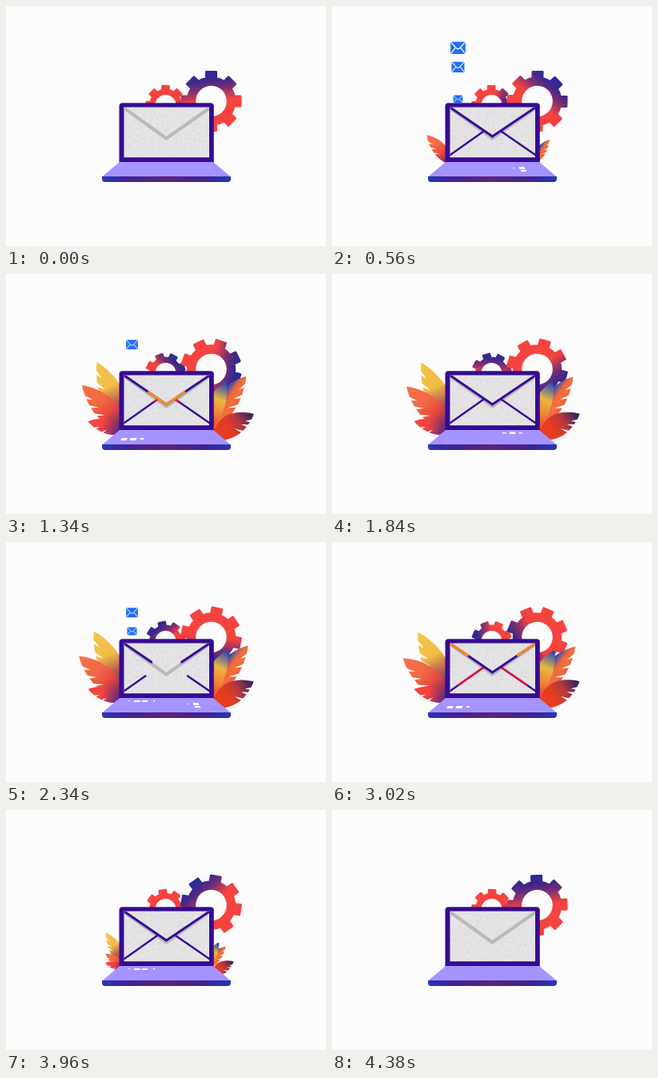
Recreate the animation shown at these times as an HTML page with a canvas. Size 400 by 300 pixels, loop 4400 ms.

```html
<!DOCTYPE html>
<html lang="en">
<head>
<meta charset="utf-8">
<title>Mail laptop</title>
<style>
html, body { margin: 0; width: 100%; height: 100%; overflow: hidden; background: #fcfcfc; }
canvas { display: block; width: 400px; height: 300px; }
</style>
</head>
<body>
<canvas id="stage"></canvas>
<script>
const LOOP = 4400, HALF = 2200, TAU = Math.PI * 2;
const canvas = document.getElementById('stage');
const ctx = canvas.getContext('2d');
const dpr = window.devicePixelRatio || 1;
canvas.width = 400 * dpr;
canvas.height = 300 * dpr;

const clamp = v => Math.max(0, Math.min(1, v));
const ramp = (t, a, b) => clamp((t - a) / (b - a));
const smooth = p => p * p * (3 - 2 * p);
const rad = deg => deg * Math.PI / 180;

function gradient(x0, y0, x1, y1, stops) {
  const g = ctx.createLinearGradient(x0, y0, x1, y1);
  stops.forEach(([at, color]) => g.addColorStop(at, color));
  return g;
}

function poly(points, close = true) {
  ctx.beginPath();
  points.forEach(([x, y], i) => i ? ctx.lineTo(x, y) : ctx.moveTo(x, y));
  if (close) ctx.closePath();
}

function roundBox(x, y, w, h, radii, fill) {
  ctx.beginPath();
  ctx.roundRect(x, y, w, h, radii);
  ctx.fillStyle = fill;
  ctx.fill();
}

// Gears
function gear(x, y, r, hole, turn, darkAt) {
  const edge = 1.4, tip = r - edge, root = r * 0.8 - edge;
  const points = [];
  for (let i = 0; i < 8; i++) {
    const mid = i * 45 - 90;
    for (const [d, q] of [[-22.5, root], [-12, root], [-9.5, tip], [9.5, tip], [12, root]]) {
      const a = rad(mid + d);
      points.push([Math.cos(a) * q, Math.sin(a) * q]);
    }
  }
  const dx = Math.cos(rad(darkAt)) * r, dy = Math.sin(rad(darkAt)) * r;
  const paint = gradient(dx, dy, -dx, -dy, [
    [0, '#2a2a9a'], [0.16, '#3f2889'], [0.32, '#86306f'], [0.5, '#f5433f'], [1, '#f5433f']
  ]);
  ctx.save();
  ctx.translate(x, y);
  ctx.rotate(rad(turn));
  ctx.fillStyle = ctx.strokeStyle = paint;
  ctx.lineJoin = 'round';
  ctx.lineWidth = edge * 2;
  poly(points);
  ctx.stroke();
  ctx.moveTo(hole, 0);
  ctx.arc(0, 0, hole, 0, TAU);
  ctx.fill('evenodd');
  ctx.restore();
}

// Leaves: base, angle, turn per second, length, half width, delay, cuts on the outer edge,
// colours from base to tip (or from inner to outer edge)
const LEAVES = [
  { x: 150, y: 200, a: -112, spin: -2.4, len: 97, w: 17, wait: 150, cuts: [12, 14, 17], c: ['#4a2a80', '#b85a52', '#f0bd48', '#f4c348'] },
  { x: 150, y: 200, a: -132, spin: -3.7, len: 82, w: 16, wait: 0, cuts: [10, 13, 16], c: ['#6a2a70', '#ea4a3e', '#f26a45', '#f27045'] },
  { x: 150, y: 200, a: -161.5, spin: 0.2, len: 50, w: 10, wait: 150, cuts: [11, 15], c: ['#452a8a', '#b0365e', '#f5443f', '#f5443f'] },
  { x: 250, y: 200, a: -55.2, spin: 1.9, len: 88, w: 16, wait: 40, across: true, cuts: [11, 14, 17], c: ['#2f4bb8', '#ee6a3a', '#f2703c', '#ee5538'] },
  { x: 250, y: 200, a: -69, spin: 1.5, len: 71, w: 13, wait: 140, cuts: [], c: ['#e0452f', '#f08a35', '#e9b640', '#2f4bb0'] },
  { x: 255, y: 208, a: -31, spin: -0.5, len: 64, w: 16, wait: 150, cuts: [12, 15, 17], c: ['#ea3c1c', '#e63c22', '#b8383e', '#37255f'] }
];

function growth(t, wait) {
  const s = t - wait, back = t - wait * 0.4;
  if (t > 3000) return 1 - smooth(ramp(back, 3620, 4220));
  return 1.05 * smooth(ramp(s, 340, 740)) - 0.05 * smooth(ramp(s, 740, 960));
}

function leaf(l, t) {
  const size = growth(t, l.wait);
  if (size < 0.01) return;
  const out = l.x < 200 ? -1 : 1;
  const side = (sign, width, cuts) => {
    const points = [];
    for (let k = 0; k <= 20; k++) {
      const u = k / 20, h = sign * width * Math.pow(Math.max(0, Math.sin(Math.PI * u)), 0.85);
      points.push([u * l.len, h]);
      if (cuts.includes(k)) points.push([(u - 0.07) * l.len, h * 0.3]);
    }
    return points;
  };
  ctx.save();
  ctx.translate(l.x, l.y);
  ctx.rotate(rad(l.a + l.spin * (t - 1340) / 1000));
  ctx.scale(size, size);
  poly([...side(out, l.w * 0.75, l.cuts), ...side(-out, l.w, []).reverse()]);
  const stops = [0.15, 0.42, 0.65, 0.95].map((at, i) => [at, l.c[i]]);
  ctx.fillStyle = l.across
    ? gradient(0, -out * l.w, 0, out * l.w, stops)
    : gradient(0, 0, l.len, 0, stops);
  ctx.fill();
  ctx.restore();
}

// Rising mail icons
const MAIL_STARTS = [0, 172, 459, 1038, 2038, 2204, 2322, 3242];

function mail(p) {
  if (p <= 0 || p >= 1) return;
  const y = 130.5 - 97.5 * p, s = (12 + (116 - y) * 0.117) / 20.7;
  ctx.save();
  ctx.globalAlpha = 1 - ramp(p, 0.82, 1);
  ctx.translate(157.5, y);
  ctx.scale(s, s);
  roundBox(-10, -8.2, 20, 16.4, 2.2, '#236ff2');
  ctx.strokeStyle = '#fff';
  ctx.lineWidth = 1.3;
  poly([[-9, -7], [-2, 0.6], [0, 1.4], [2, 0.6], [9, -7]], false);
  ctx.stroke();
  for (const m of [-1, 1]) {
    poly([[m * 9, 7], [m * 3.6, 0]], false);
    ctx.stroke();
  }
  ctx.restore();
}

// Envelope lines, all running from a corner to the middle
const FLAP = [[[148, 127], [200.5, 163]], [[254, 127], [200.5, 163]]];
const FOLD = [[[148, 186], [189, 157]], [[254, 186], [212, 157]]];

function trim(lines, from, to, color, width) {
  if (to - from < 0.005) return;
  ctx.strokeStyle = color;
  ctx.lineWidth = width;
  for (const [[x0, y0], [x1, y1]] of lines) {
    const at = p => [x0 + (x1 - x0) * p, y0 + (y1 - y0) * p];
    poly([at(from), at(to)], false);
    ctx.stroke();
  }
}

function envelope(t) {
  const s = t % HALF;
  ctx.lineCap = ctx.lineJoin = 'round';
  ctx.strokeStyle = '#b9b9bb';
  ctx.lineWidth = 4;
  poly([[148, 128], [200.5, 165.5], [254, 128]], false);
  ctx.stroke();
  const drawn = Math.min(ramp(s, 0, 220), 1 - ramp(s, 1960, 2170));
  trim(FOLD, 0, drawn, '#3a0d96', 2.5);
  trim(FOLD, ramp(s, 625, 1400), ramp(s, 600, 800), '#e4163f', 2.5);
  trim(FLAP, 0, drawn, '#3a0d96', 3);
  trim(FLAP, Math.pow(ramp(s, 800, 1405), 4.9), ramp(s, 710, 985), '#f8901f', 3);
}

// Fine static grain for the screen
let seed = 7;
const random = () => (seed = seed * 16807 % 2147483647) / 2147483647;
const GRAIN = Array.from({ length: 1800 }, () => [147 + random() * 106, 127 + random() * 61]);

// Keys: x, y, width, height
const KEYS = {
  A: [[234, 201, 7, 3], [236, 205, 7, 2], [226, 202, 2, 1]],
  B: [[144, 205, 7, 3], [155, 205, 8, 3], [168, 205, 4, 2]],
  C: [[153, 198, 2, 1], [160, 198, 8, 2], [170, 198, 7, 2], [184, 198, 2, 1.5]],
  D: [[213, 198, 5, 1.5], [222, 197.5, 7, 2.5], [234, 198, 4, 1.5]]
};
const TYPING = ['', 'B', 'A', 'D', 'C', 'A', 'B', 'C', 'D', 'B', 'CA', 'D', 'A', 'B', 'C', 'A', 'D', 'B', 'C', ''];

function laptop(t) {
  roundBox(141.5, 121.3, 118.3, 75, [4, 4, 0, 0], '#360b92');
  ctx.save();
  ctx.beginPath();
  ctx.rect(147.5, 126.5, 106.5, 62.7);
  ctx.clip();
  ctx.fillStyle = '#e3e3e5';
  ctx.fillRect(147, 126, 108, 64);
  GRAIN.forEach(([x, y], i) => {
    ctx.fillStyle = i % 2 ? 'rgba(255,255,255,.28)' : 'rgba(190,190,196,.28)';
    ctx.fillRect(x, y, 1, 1);
  });
  envelope(t);
  ctx.restore();

  poly([[142, 195], [259, 195], [281, 213.5], [120, 213.5]]);
  ctx.fillStyle = '#a594ff';
  ctx.fill();
  roundBox(120, 213, 161, 7.1, [1, 1, 4, 4], gradient(120, 0, 281, 0, [
    [0, '#2639b2'], [0.2, '#3f2394'], [0.5, '#5c2578'], [0.8, '#3f2394'], [1, '#2639b2']
  ]));
  ctx.fillStyle = '#fff';
  for (const group of TYPING[Math.floor(t / 220)])
    for (const [x, y, w, h] of KEYS[group]) {
      const lean = (200 - x) * 0.015;
      poly([[x + lean, y], [x + w + lean, y], [x + w - lean, y + h], [x - lean, y + h]]);
      ctx.fill();
    }
}

function draw(t) {
  ctx.setTransform(dpr, 0, 0, dpr, 0, 0);
  ctx.fillStyle = '#fcfcfc';
  ctx.fillRect(0, 0, 400, 300);
  const turn = t / LOOP * 360;
  MAIL_STARTS.forEach(start => mail((t - start) / 700));
  gear(199.5, 124, 25.5, 13, -turn, 65);
  gear(256.5, 119, 38.5, 19.3, turn, -97);
  LEAVES.forEach(l => leaf(l, t));
  laptop(t);
}

const began = performance.now();
function tick() {
  draw((performance.now() - began) % LOOP);
  requestAnimationFrame(tick);
}
tick();
</script>
</body>
</html>
```
